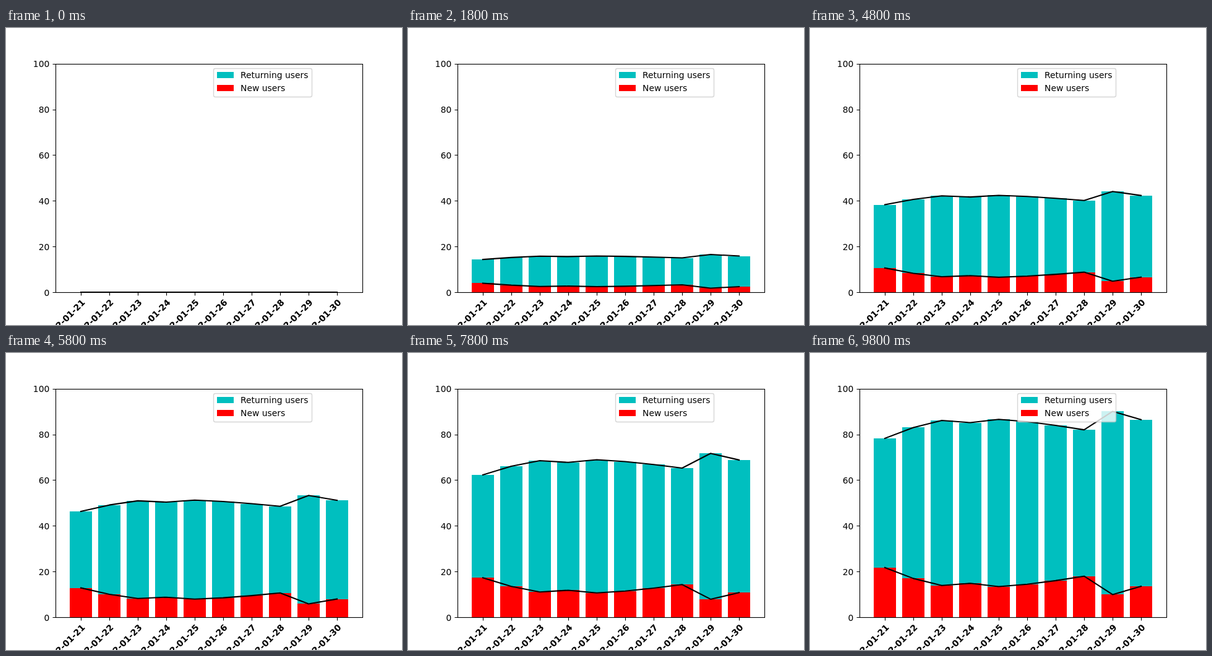
An HTML page that plays this animation: 640 by 480 pixels, repeating every 10 s.

```html
<!DOCTYPE html>
<html lang="en">
<head>
<meta charset="utf-8">
<title>Returning and new users</title>
<style>
  html, body { margin: 0; width: 100%; height: 100%; overflow: hidden; background: #fff; }
  svg { display: block; width: 640px; height: 480px; }
  text { font: 13.89px "DejaVu Sans", sans-serif; fill: #000; }
  .date { font-weight: bold; text-anchor: end; }
  .value { text-anchor: end; }
  .axis { fill: none; stroke: #000; stroke-width: 1.11; }
  .trend { fill: none; stroke: #000; stroke-width: 2.08; stroke-linecap: square; stroke-linejoin: round; }
</style>
</head>
<body>
<svg id="chart" viewBox="0 0 640 480">
  <defs><clipPath id="plot"><rect x="80" y="57.6" width="496" height="369.6"/></clipPath></defs>
</svg>
<script>
const STEP = 200, STEPS = 50;
const BASE = 427.2, UNIT = 3.696, PITCH = 496 / 10.78, FIRST = 80 + 0.89 * PITCH;
const CYAN = '#00bfbf', RED = '#f00';
const newShare = [21.75, 17, 13.9, 14.87, 13.43, 14.45, 16.05, 18, 9.95, 13.55];
const returningShare = newShare.map(v => 100 - v);

const chart = document.getElementById('chart');

function add(tag, attrs, text) {
  const node = document.createElementNS(chart.namespaceURI, tag);
  for (const key in attrs) node.setAttribute(key, attrs[key]);
  if (text !== undefined) node.textContent = text;
  return chart.appendChild(node);
}

const centre = i => FIRST + i * PITCH;

function makeBars(values, fill) {
  return values.map((_, i) => {
    const left = Math.round(centre(i) - 0.4 * PITCH);
    const right = Math.round(centre(i) + 0.4 * PITCH);
    return add('rect', { x: left, width: right - left, fill });
  });
}

const series = [
  { values: returningShare, bars: makeBars(returningShare, CYAN) },
  { values: newShare, bars: makeBars(newShare, RED) }
];
for (const s of series) s.line = add('polyline', { class: 'trend', 'clip-path': 'url(#plot)' });

function drawAxes() {
  let ticks = '';
  newShare.forEach((_, i) => {
    const x = centre(i);
    ticks += `M${Math.round(x) + 0.5} 427.5v5`;
    add('text', { class: 'date', transform: `translate(${x + 7.6} 444.5) rotate(-45)` }, `2022-01-${21 + i}`);
  });
  for (let v = 0; v <= 100; v += 20) {
    const y = BASE - v * UNIT;
    ticks += `M80.5 ${Math.round(y) + 0.5}h-5`;
    add('text', { class: 'value', x: 70.3, y: Math.round(y + 5.4) }, v);
  }
  add('path', { class: 'axis', d: ticks });
  add('rect', { class: 'axis', x: 80.5, y: 58.5, width: 496, height: 369 });
}

function drawLegend() {
  add('rect', {
    x: 335.5, y: 65.5, width: 159, height: 46, rx: 2.78,
    fill: '#fff', stroke: '#ccc', 'stroke-width': 1.39, opacity: 0.8
  });
  [['Returning users', CYAN], ['New users', RED]].forEach(([label, fill], i) => {
    const y = 71 + 21 * i;
    add('rect', { x: 341, y, width: 27, height: 10, fill });
    add('text', { x: 379, y: y + 10 }, label);
  });
}

function render(time) {
  const step = Math.floor(time / STEP) % STEPS;
  const grow = step / (STEPS - 1);
  for (const { values, bars, line } of series) {
    const points = values.map((v, i) => {
      const y = BASE - v * grow * UNIT;
      const top = Math.round(y);
      bars[i].setAttribute('y', top);
      bars[i].setAttribute('height', 427 - top);
      // A flat line sits on whole pixels
      return step ? `${centre(i)},${y}` : `${Math.round(centre(i))},427`;
    });
    line.setAttribute('points', points.join(' '));
  }
}

drawAxes();
drawLegend();

const start = performance.now();
function tick() {
  render(performance.now() - start);
  requestAnimationFrame(tick);
}
tick();
</script>
</body>
</html>
```
